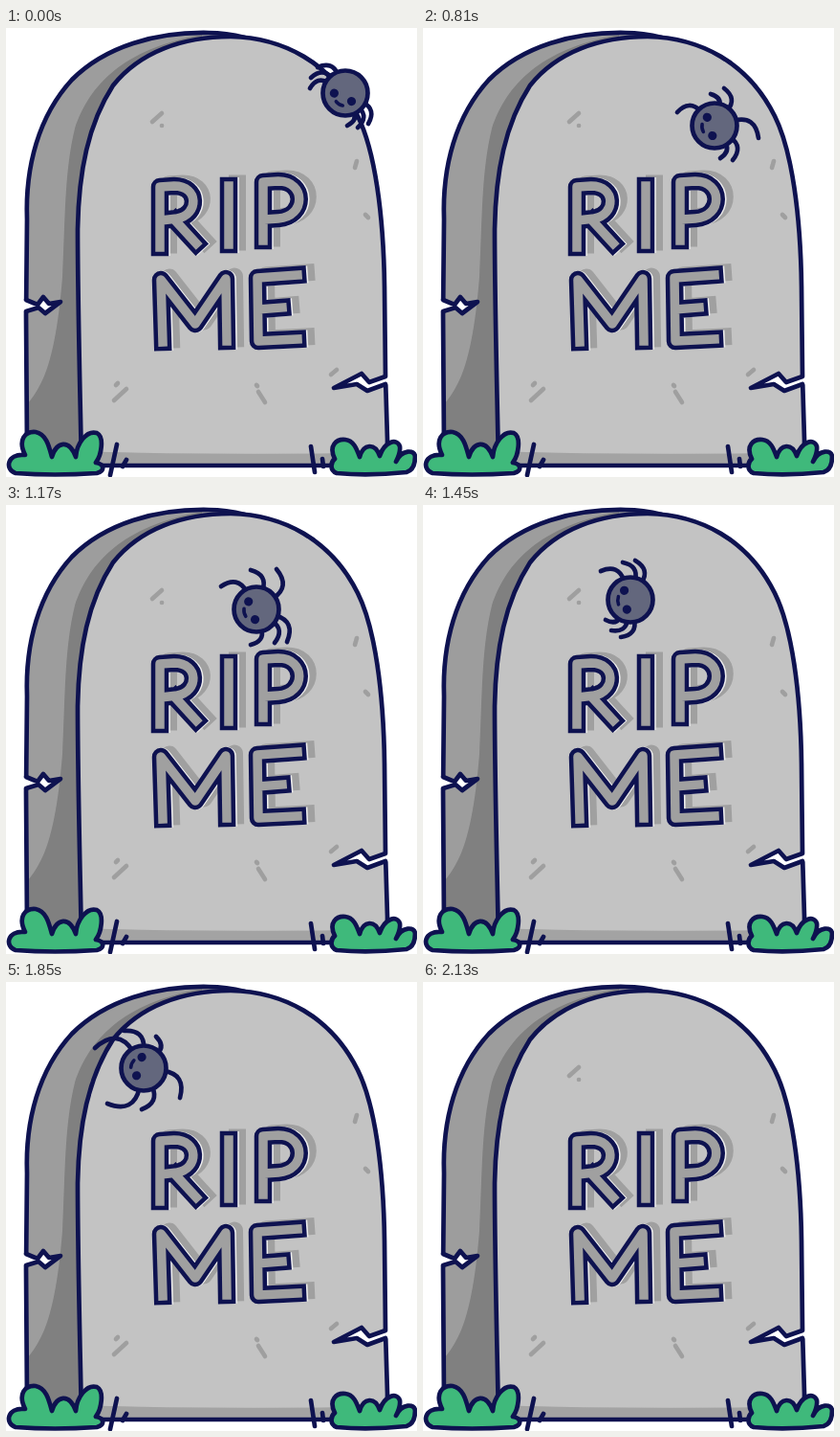
Recreate the animation shown at these times as an HTML page. Size 430 by 469 pixels, loop 2210 ms.

```html
<!DOCTYPE html>
<html lang="en">
<head>
<meta charset="utf-8">
<title>Spider on a gravestone</title>
<style>
html, body { margin: 0; width: 100%; height: 100%; overflow: hidden; background: #fff; }
svg { display: block; width: 100vw; height: 100vh; }
.ink { stroke: #0e1250; stroke-width: 4.7; stroke-linecap: round; stroke-linejoin: round; }
.word { fill: none; stroke-linecap: square; stroke-linejoin: round; }
</style>
</head>
<body>
<svg viewBox="0 0 430 469" fill="none">
  <defs>
    <path id="side" d="M22 440L21 300L22 200C20 145 34 92 69 54C104 19 157 4 212 5Q230 5 250 10L180 200L80 457Z"/>
    <path id="front" d="M79 457C78 400 75 290 75 210C76 150 86 100 112 60C140 25 185 9 235 9C290 10 340 36 368 92C386 128 395 195 396 270L397 364L399 430V457Z"/>
    <clipPath id="inSide"><use href="#side"/></clipPath>
    <clipPath id="inFront"><use href="#front"/></clipPath>
    <path id="word" d="M161 229L161 166L176 165C202 165 202 195 179 199L162 201M177 201L199 225
      M233 165V226M269 222L269 161L285 160C314 160 314 197 285 199L270 200
      M164 328L162 263L198 309L230 262L231 327M305 258L263 261L264 327L305 325M264 294L289 292"/>
  </defs>

  <use href="#side" fill="#9d9d9d"/>
  <path clip-path="url(#inSide)" fill="#808080" d="M205 7C122 22 87 60 72 105C61 150 62 200 59 260C55 310 48 350 36 372Q29 386 20 395V460H205Z"/>
  <use href="#side" class="ink"/>
  <use href="#front" fill="#c3c3c3"/>
  <path clip-path="url(#inFront)" fill="#a3a3a3" d="M70 442Q240 447 410 443V460H70Z"/>
  <use href="#front" class="ink"/>

  <!-- cracks -->
  <path fill="#fff" d="M16 283L33 289L39 281L45 289L57 286L41 298L34 292L16 297Z"/>
  <path class="ink" d="M21 284L33 289L39 281L45 288L57 286L41 298L34 292L21 296"/>
  <path fill="#fff" d="M404 362L380 370L372 361L343 376L367 372L378 379L404 371Z"/>
  <path class="ink" d="M397 364L380 370L372 361L343 376L367 372L378 379L397 372"/>

  <path stroke="#9f9f9f" stroke-width="4.6" stroke-linecap="round" d="M153 98L163 89M163 102h.1M365 146L367 139M376 195L379 198M113 389L126 377M115 373L117 371M262 373L263 374M264 380L271 391M340 362L346 357"/>

  <!-- carved words -->
  <use href="#word" class="word" stroke="#a0a0a0" stroke-width="18" x="9" y="-2.5"/>
  <use href="#word" class="word" stroke="#eee" stroke-width="18" x="1.8"/>
  <use href="#word" class="word" stroke="#0e1250" stroke-width="18.5"/>
  <use href="#word" class="word" stroke="#a0a0a0" stroke-width="9.5"/>

  <!-- grass -->
  <g class="ink" fill="#3fb97b">
    <path d="M10 465C-1 462 0 444 20 446C12 430 20 421 31 422C42 424 45 437 48 448C53 432 66 429 73 448C74 434 84 420 95 423C103 427 100 446 94 454C104 456 103 463 95 465Q50 468 10 465Z"/>
    <path d="M346 465C338 462 340 453 344 450C337 436 346 429 355 430C364 431 367 440 370 448C374 434 386 433 391 447C396 432 409 428 412 437C413 443 410 449 408 453C414 440 428 440 428 448C428 456 426 462 419 464Q380 468 346 465Z"/>
    <path d="M116 435L109 467M126 451L122 458M319 437L323 464M331 450L332 458"/>
  </g>

  <g id="spider">
    <path id="legs" class="ink"/>
    <circle r="23.5" class="ink" fill="#63677d"/>
    <g id="face">
      <circle cx="-10.5" cy="5" r="4.6" fill="#0e1250"/>
      <circle cx="9.5" cy="5" r="4.6" fill="#0e1250"/>
      <path class="ink" style="stroke-width:3.6" d="M-5 12Q-1 14 3 13"/>
    </g>
  </g>
</svg>
<script>
const LOOP = 2210, GONE = 2130;
const $ = id => document.getElementById(id);

// Leg tips around the body: three on one side, then three on the other.
const tucked = [-37,-5, -36,-16, -29,-27, 2,34, 13,36, 24,32];
const reach = [-43,0, -27,-31, -6,-46, 14,32, 35,17, 45,12];
const stride = [-39,-14, -4,-33, 10,-39, 6,34, 19,36, 46,13];
const gather = [-37,-24, -6,-41, 21,-42, -6,37, 19,35, 32,34];
const curl = [-31,-30, -8,-39, 5,-41, -26,21, -20,32, -10,39];
const sprawl = [-51,-21, -20,-39, 13,-33, -38,37, -2,43, 38,31];

// time, x, y, heading, leg pose
const keys = [
  [0, 355, 68, 25, tucked],
  [400, 333, 89, 35, reach],
  [480, 324, 94, 50, gather],
  [570, 324, 94, 50, gather],
  [810, 305, 102, 74, stride],
  [1170, 262, 109, 70, gather],
  [1450, 217, 99, 82, curl],
  [1730, 168, 94, 92, gather],
  [1850, 144, 90, 106, sprawl],
  [2090, 86, 60, 128, gather]
];

const mix = (a, b, k) => a + (b - a) * k;

function step(t) {
  if (t < 480) return Math.floor(t / 80) * 80;
  if (t < 650) return 480;
  const size = t < 970 ? 80 : 40;
  return 650 + Math.floor((t - 650) / size) * size;
}

// Longer legs curl further round the body.
function leg(x, y, side) {
  const size = Math.hypot(x, y);
  const a = Math.atan2(y, x) + side * size / 90;
  const at = r => `${r * Math.cos(a)} ${r * Math.sin(a)}`;
  return `M${at(21)}Q${at(size * .92)} ${x} ${y}`;
}

function draw(now) {
  const time = now % LOOP, t = step(time);
  $("spider").style.display = time < GONE ? "" : "none";
  let i = 0;
  while (i < keys.length - 2 && t >= keys[i + 1][0]) i++;
  const a = keys[i], b = keys[i + 1];
  const k = Math.min(1, (t - a[0]) / (b[0] - a[0]));
  const [x, y, turn] = [1, 2, 3].map(n => mix(a[n], b[n], k));
  const tips = a[4].map((v, n) => mix(v, b[4][n], k));
  let d = "";
  for (let n = 0; n < 6; n++) d += leg(tips[2 * n], tips[2 * n + 1], n < 3 ? 1 : -1);
  $("legs").setAttribute("d", d);
  $("spider").setAttribute("transform", `translate(${x} ${y})`);
  $("face").setAttribute("transform", `rotate(${turn})`);
}

const start = performance.now();
function tick() {
  draw(performance.now() - start);
  requestAnimationFrame(tick);
}
tick();
</script>
</body>
</html>
```
